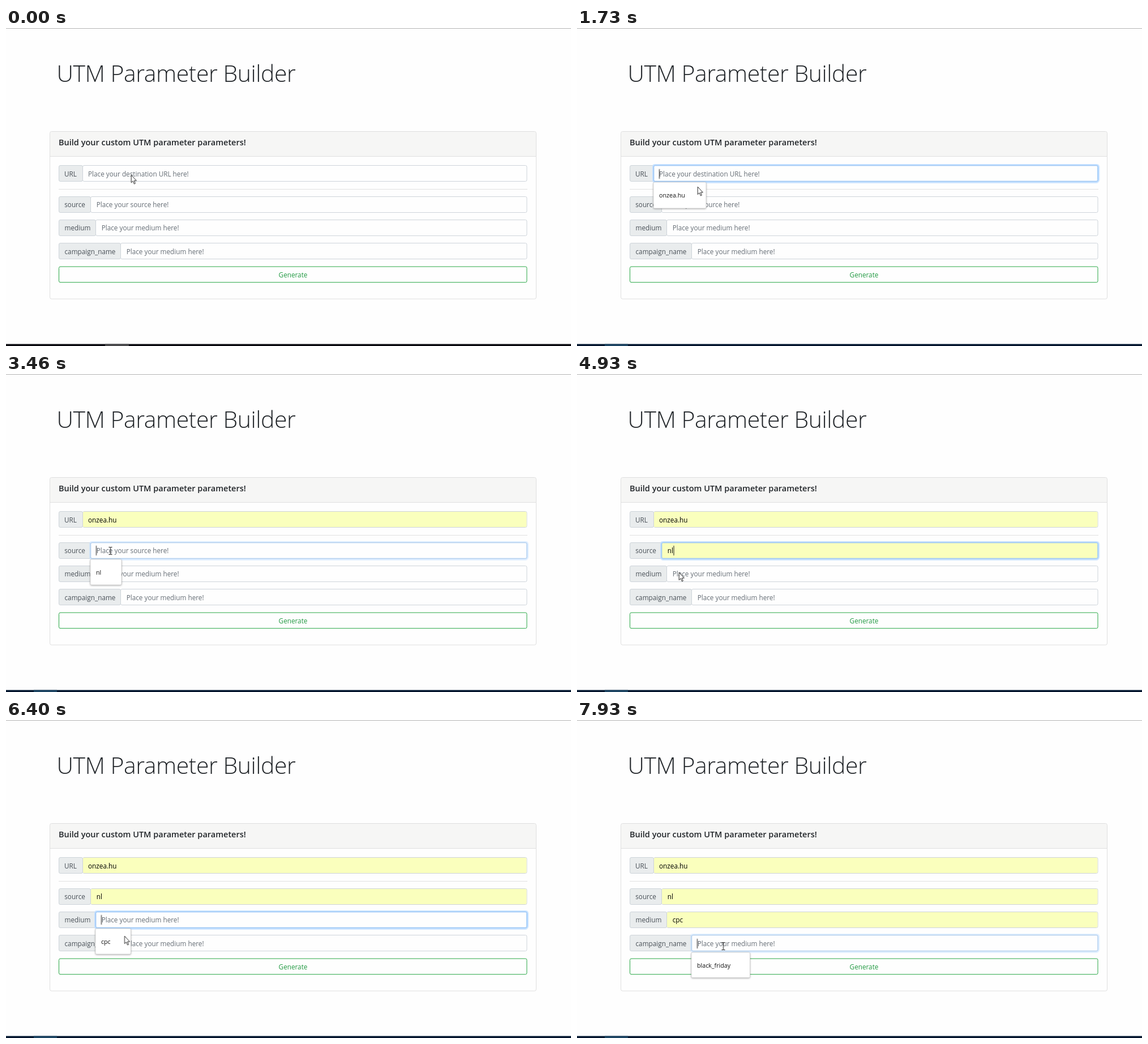
Recreate the animation shown at these times as an HTML page. Size 998x561 px, loop 8000 ms.

```html
<!DOCTYPE html>
<html lang="en">
<head>
<meta charset="utf-8">
<title>UTM Parameter Builder</title>
<style>
html, body { margin: 0; width: 100%; height: 100%; overflow: hidden; background: #fefefe; }
svg { display: block; width: 998px; height: 561px; }
text { font: 11.76px "Open Sans", "Noto Sans", sans-serif; fill: #656d75; }
.title { font-size: 41px; font-weight: 300; letter-spacing: -.5px; fill: #212529; }
.head { font-size: 14.5px; font-weight: 600; fill: #212529; }
.tag { fill: #495057; }
.go { fill: #239a43; text-anchor: middle; }
.box { fill: #fefefe; stroke: #ced4da; }
.cap { fill: #e9eced; stroke: #ced4da; }
.fill rect { fill: #faffbd; }
.fill text { fill: #000; }
.glow { fill: none; stroke: #c4e0ff; stroke-width: 2.4; }
.edge { fill: none; stroke: #78b8ff; }
.caret { fill: #111; }
.list > rect { fill: #fff; stroke: #c9c9c9; stroke-width: .7; filter: drop-shadow(0 1px 1.5px rgba(0,0,0,.3)); }
.list text { font-size: 10.65px; fill: #111; }
.list .hover { fill: #e8e8e8; stroke: none; filter: none; }

/* One shared 8 s clock; every part is hidden until its keyframes show it. */
.t { opacity: 0; animation: 8s step-end infinite; }
.ring { opacity: 0; animation: 8s linear infinite; }
.move { animation: move 8s linear infinite; }

@keyframes awayBar { 0% { opacity: 1 } 6.63% { opacity: 0 } }
@keyframes bar { 6.63%, 100% { opacity: 1 } }

@keyframes ring1 { 0%, 6.63% { opacity: 0 } 8.5%, 42% { opacity: 1 } 43%, 100% { opacity: 0 } }
@keyframes ring2 { 0%, 42% { opacity: 0 } 44.1%, 75% { opacity: 1 } 76%, 100% { opacity: 0 } }
@keyframes ring3 { 0%, 75% { opacity: 0 } 77%, 98% { opacity: 1 } 99%, 100% { opacity: 0 } }
@keyframes ring4 { 0%, 98% { opacity: 0 } 100% { opacity: 1 } }

@keyframes fill1 { 22.5%, 100% { opacity: 1 } }
@keyframes fill2 { 53%, 100% { opacity: 1 } }
@keyframes fill3 { 81.5%, 100% { opacity: 1 } }

@keyframes list1 { 6.63% { opacity: 1 } 26.63% { opacity: 0 } }
@keyframes list2 { 42.4% { opacity: 1 } 59.13% { opacity: 0 } }
@keyframes list3 { 75.6% { opacity: 1 } 87.5% { opacity: 0 } }
@keyframes list4 { 98.3%, 100% { opacity: 1 } }

@keyframes caret1 { 6.63%, 20.6% { opacity: 1 } 14.13%, 22.5% { opacity: 0 } }
@keyframes caret2 { 42% { opacity: 1 } 48.25% { opacity: 0 } }
@keyframes caret3 { 75% { opacity: 1 } 81.5% { opacity: 0 } }
@keyframes caret4 { 98.1%, 100% { opacity: 1 } }
@keyframes end1 { 30% { opacity: 1 } 36.6% { opacity: 0 } }
@keyframes end2 { 61.5% { opacity: 1 } 68.3% { opacity: 0 } }
@keyframes end3 { 90.75% { opacity: 1 } 97.3% { opacity: 0 } }

@keyframes arrow {
  0%, 20.6%, 52.3%, 77.4% { opacity: 1 }
  6.63%, 32.8%, 63%, 92% { opacity: 0 }
}
@keyframes beam {
  0%, 20.6%, 52.3%, 77.4% { opacity: 0 }
  6.63%, 32.8%, 63%, 92%, 100% { opacity: 1 }
}
@keyframes move {
  0%, 18.5% { transform: translate(221px, 259.3px) }
  21.63% { transform: translate(213px, 280px) }
  23.25%, 26.63% { transform: translate(210px, 295px) }
  28.5%, 29.9% { transform: translate(209.3px, 286px) }
  36.6% { transform: translate(185.5px, 312px) }
  37.5%, 50% { transform: translate(184.5px, 312px) }
  55%, 59.13% { transform: translate(180px, 354px) }
  61%, 63% { transform: translate(180px, 350px) }
  69.1% { transform: translate(234.5px, 363.5px) }
  70%, 72.5% { transform: translate(234px, 363.5px) }
  73.25%, 76.6% { transform: translate(233.5px, 362.5px) }
  80% { transform: translate(209.3px, 381px) }
  82.5%, 85% { transform: translate(189px, 395px) }
  85.75%, 90% { transform: translate(188px, 394.5px) }
  97.4%, 100% { transform: translate(258.5px, 399px) }
}
</style>
</head>
<body>
<svg viewBox="0 0 998 561">
  <rect width="998" height="561" fill="#fefefe"/>
  <rect width="998" height="1" fill="#b4b4b4"/>

  <g class="t" style="animation-name:awayBar">
    <rect y="557.5" width="998" height="3.5" fill="#0a0a10"/>
    <rect x="175" y="557.5" width="42" height="3.5" fill="#48484b"/>
  </g>
  <g class="t" style="animation-name:bar">
    <rect y="557.5" width="998" height="3.5" fill="#00162e"/>
    <rect x="49" y="557.5" width="41" height="3.5" fill="#1c4462"/>
  </g>

  <text class="title" x="89.5" y="94.5">UTM Parameter Builder</text>

  <rect x="77.5" y="182.5" width="859" height="295.5" rx="3" fill="#fefefe"/>
  <path d="M78 226V185.5Q78 183 80.5 183H933.5Q936 183 936 185.5V226Z" fill="#f6f6f5"/>
  <path d="M78 226.5H936M93 284.5H921" stroke="#e0e0e0"/>
  <rect x="77.5" y="182.5" width="859" height="295.5" rx="3" fill="none" stroke="#dfdfdf"/>
  <text class="head" x="93" y="207">Build your custom UTM parameter parameters!</text>

  <g transform="translate(135.5 242.5)">
    <rect class="cap" x="-42" width="42" height="28" rx="2.5"/>
    <text class="tag" x="-32.5" y="19">URL</text>
    <rect class="box" width="784.5" height="28" rx="2.5"/>
    <text x="9.5" y="19">Place your destination URL here!</text>
    <g class="t fill" style="animation-name:fill1">
      <rect x=".5" y=".5" width="783.5" height="27" rx="2"/>
      <text x="9.5" y="19">onzea.hu</text>
    </g>
    <g class="ring" style="animation-name:ring1">
      <rect class="glow" x="-1.6" y="-1.6" width="787.7" height="31.2" rx="4"/>
      <rect class="edge" width="784.5" height="28" rx="2.5"/>
    </g>
    <rect class="t caret" style="animation-name:caret1" x="9.5" y="6.5" width="1" height="17"/>
    <rect class="t caret" style="animation-name:end1" x="59.5" y="6.5" width="1" height="17"/>
  </g>

  <g transform="translate(149.5 297.5)">
    <rect class="cap" x="-56" width="56" height="28" rx="2.5"/>
    <text class="tag" x="-46.3" y="18.7">source</text>
    <rect class="box" width="770.5" height="28" rx="2.5"/>
    <text x="10.2" y="18.7">Place your source here!</text>
    <g class="t fill" style="animation-name:fill2">
      <rect x=".5" y=".5" width="769.5" height="27" rx="2"/>
      <text x="10.2" y="18.7">nl</text>
    </g>
    <g class="ring" style="animation-name:ring2">
      <rect class="glow" x="-1.6" y="-1.6" width="773.7" height="31.2" rx="4"/>
      <rect class="edge" width="770.5" height="28" rx="2.5"/>
    </g>
    <rect class="t caret" style="animation-name:caret2" x="9.5" y="5.5" width="1" height="17"/>
    <rect class="t caret" style="animation-name:end2" x="21" y="5.5" width="1" height="17"/>
  </g>

  <g transform="translate(158.5 338.5)">
    <rect class="cap" x="-65" width="65" height="28" rx="2.5"/>
    <text class="tag" x="-55" y="18.7">medium</text>
    <rect class="box" width="761.5" height="28" rx="2.5"/>
    <text x="10.2" y="18.7">Place your medium here!</text>
    <g class="t fill" style="animation-name:fill3">
      <rect x=".5" y=".5" width="760.5" height="27" rx="2"/>
      <text x="10.2" y="18.7">cpc</text>
    </g>
    <g class="ring" style="animation-name:ring3">
      <rect class="glow" x="-1.6" y="-1.6" width="764.7" height="31.2" rx="4"/>
      <rect class="edge" width="761.5" height="28" rx="2.5"/>
    </g>
    <rect class="t caret" style="animation-name:caret3" x="9.5" y="5.5" width="1" height="17"/>
    <rect class="t caret" style="animation-name:end3" x="29.5" y="5.5" width="1" height="17"/>
  </g>

  <g transform="translate(202.5 379.5)">
    <rect class="cap" x="-109" width="109" height="28" rx="2.5"/>
    <text class="tag" x="-99" y="19">campaign_name</text>
    <rect class="box" width="717.5" height="28" rx="2.5"/>
    <text x="10.2" y="19">Place your medium here!</text>
    <g class="ring" style="animation-name:ring4">
      <rect class="glow" x="-1.6" y="-1.6" width="720.7" height="31.2" rx="4"/>
      <rect class="edge" width="717.5" height="28" rx="2.5"/>
    </g>
    <rect class="t caret" style="animation-name:caret4" x="9.5" y="6.5" width="1" height="17"/>
  </g>

  <rect x="93.5" y="421" width="826.5" height="27.7" rx="2.5" fill="#fefefe" stroke="#28a745"/>
  <text class="go" x="507" y="439.7">Generate</text>

  <g transform="translate(135 272)"><g class="t list" style="animation-name:list1">
    <rect width="93" height="46" rx="2"/>
    <rect class="t hover" style="animation-name:fill1" x=".5" y="9.5" width="92" height="27"/>
    <text x="10" y="27">onzea.hu</text>
  </g></g>
  <g transform="translate(149 327)"><g class="t list" style="animation-name:list2">
    <rect width="55" height="45" rx="2"/>
    <rect class="t hover" style="animation-name:fill2" x=".5" y="9" width="54" height="27"/>
    <text x="10" y="26.5">nl</text>
  </g></g>
  <g transform="translate(158 368)"><g class="t list" style="animation-name:list3">
    <rect width="62.5" height="45" rx="2"/>
    <rect class="t hover" style="animation-name:fill3" x=".5" y="9" width="61.5" height="27"/>
    <text x="10" y="26.5">cpc</text>
  </g></g>
  <g transform="translate(202 410)"><g class="t list" style="animation-name:list4">
    <rect width="103.5" height="44.5" rx="2"/>
    <text x="10" y="26.5">black_friday</text>
  </g></g>

  <g class="move">
    <path class="t" style="animation-name:arrow" d="M.2 0V13.5L3.2 10.7L5.4 15.8L7.4 14.9L5.3 10H9.4Z" fill="#fff" stroke="#111" stroke-width=".9"/>
    <path class="t" style="animation-name:beam" d="M-3 -6.5H-1L0 -5.8L1 -6.5H3M0 -5.8V5.8M-3 6.5H-1L0 5.8L1 6.5H3" fill="none" stroke="#111"/>
  </g>
</svg>
</body>
</html>
```
